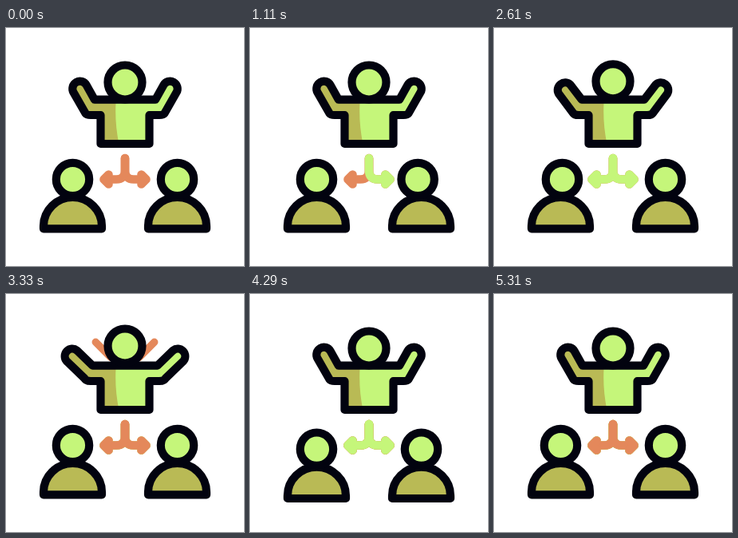
An HTML page that plays this animation: 298x298 px, repeating every 5400 ms.

```html
<!DOCTYPE html>
<html lang="en">
<head>
<meta charset="utf-8">
<title>Team leader</title>
<style>
html, body { margin: 0; width: 100%; height: 100%; overflow: hidden; background: #fff; }
svg { display: block; width: 100vw; height: 100vh; }
.line { fill: none; stroke-linecap: round; stroke-linejoin: round; }
.outline { stroke: #02030f; stroke-width: 10.2; stroke-linejoin: round; }
.arrow { stroke-width: 10.6; }
.ray { stroke: #e4885b; stroke-width: 9.4; }
</style>
</head>
<body>
<svg viewBox="0 0 298 298">
  <defs>
    <clipPath id="bodyClip"><path class="bodyPath"/></clipPath>
    <path id="bust" d="M47 251.300V248A36.500 36 0 0 1 120 248V251.300Z" fill="#b9ba55" class="outline"/>
    <circle id="face" cx="83.500" cy="189.500" r="20.700" fill="#c5f67a" class="outline"/>
  </defs>
  <g id="rays"></g>
  <g clip-path="url(#bodyClip)">
    <rect x="60" y="55" width="180" height="95" fill="#c5f67a"/>
    <path d="M60 55H137.500V94Q136 122 142.500 150H60Z" fill="#b9ba55"/>
  </g>
  <path class="bodyPath line outline"/>
  <circle id="head" cx="149" cy="68" r="21.500" fill="#c5f67a" class="outline"/>
  <g id="arrows"></g>
  <g id="members">
    <use href="#bust"/>
    <use href="#bust" x="131"/>
    <use href="#face" id="leftFace"/>
    <use href="#face" id="rightFace"/>
  </g>
</svg>
<script>
const LOOP = 5400, STEP = 30, LAST = 5310, BEAT = 590;
const ORANGE = '#e4885b', GREEN = '#c5f67a';
const find = id => document.getElementById(id);
const bodies = document.querySelectorAll('.bodyPath');

const clamp = x => Math.min(1, Math.max(0, x));
const ramp = (x, from, to) => clamp((x - from) / (to - from));
const smooth = x => x * x * (3 - 2 * x);
const hump = x => Math.sin(Math.PI * x) ** 2;
const mix = (a, b, k) => a + (b - a) * k;

function addPath(parent, className, d, stroke) {
  const path = document.createElementNS('http://www.w3.org/2000/svg', 'path');
  path.setAttribute('class', 'line ' + className);
  if (d) path.setAttribute('d', d);
  if (stroke) path.setAttribute('stroke', stroke);
  parent.append(path);
  return path;
}

// Shows the first part of a path, or nothing at all.
function reveal(path, amount) {
  path.style.display = amount > 0 ? '' : 'none';
  path.setAttribute('pathLength', 1);
  path.setAttribute('stroke-dasharray', amount < 1 ? amount + ' 2' : 'none');
}

function makeArrow(side, color) {
  const x = d => 149 + side * d;
  return {
    shaft: addPath(find('arrows'), 'arrow',
      `M149 163V178Q149 189.500 ${x(11)} 189.500H${x(23)}`, color),
    tip: addPath(find('arrows'), 'arrow',
      `M${x(20.5)} 183.500L${x(26.5)} 189.500L${x(20.5)} 195.500`, color)
  };
}

function growArrow(arrow, amount) {
  reveal(arrow.shaft, ramp(amount, 0, 0.78));
  reveal(arrow.tip, ramp(amount, 0.78, 1));
}

const layers = [ORANGE, GREEN, ORANGE, GREEN, ORANGE].map(color =>
  [1, -1].map(side => makeArrow(side, color)));

// Start and end of each colour sweep: right arrow, then left arrow.
const sweeps = [
  [[-2, -1], [-2, -1]],
  [[0, 540], [1140, 1740]],
  [[2850, 3300], [2850, 3300]],
  [[3330, 3900], [3330, 3900]],
  [[4560, 5100], [4560, 5100]]
];

const rays = [-1, 0, 1].map(side => ({
  path: addPath(find('rays'), 'ray'),
  angle: side * Math.PI / 4
}));

function armPoints(wide) {
  const p = (x0, y0, x1, y1) => [mix(x0, x1, wide), mix(y0, y1, wide)];
  return {
    elbow: p(99.6, 107, 98.2, 105.5),
    outer: p(84.5, 80.6, 76, 84.1),
    inner: p(100.7, 71.4, 88.8, 70.7),
    shoulder: p(110.9, 89.7, 108.4, 89.7)
  };
}

function bodyPath(wide) {
  const { elbow, outer, inner, shoulder } = armPoints(wide);
  const flip = ([x, y]) => [298 - x, y];
  return `M118.500 145V109H106Q${elbow[0] + 1.5} 109 ${elbow}L${outer}` +
    `A9.300 9.300 0 0 1 ${inner}L${shoulder}L${flip(shoulder)}L${flip(inner)}` +
    `A9.300 9.300 0 0 1 ${flip(outer)}L${flip(elbow)}` +
    `Q${298 - elbow[0] - 1.5} 109 192 109H179.500V145Z`;
}

function drawRays(beat) {
  const phase = beat % 1;
  const active = beat > 5 && beat < 9 && phase > 0.45;
  const end = mix(30, 75.3, ramp(phase, 0.45, 0.85));
  const start = mix(25, 75.3, ramp(phase, 0.85, 1));
  for (const { path, angle } of rays) {
    const at = r => `${149 + r * Math.sin(angle)} ${97 - r * Math.cos(angle)}`;
    path.style.display = active ? '' : 'none';
    path.setAttribute('d', `M${at(start)}L${at(end)}`);
  }
}

function drawMembers(time, beat) {
  const nodding = beat > 5.75 && beat < 8.75;
  const nod = nodding ? 4.7 * hump(beat - 5.75) : 0;
  find('members').setAttribute('transform', `translate(0 ${nod})`);
  find('rightFace').setAttribute('x', 131 - 4.6 * hump(ramp(time, 510, 1560)));
  find('leftFace').setAttribute('x', 4.6 * hump(ramp(time, 1800, 2850)));
}

function draw(time) {
  const beat = time / BEAT, phase = beat % 1;
  const wide = smooth(ramp(phase, 0.28, 0.6)) - smooth(ramp(phase, 0.68, 0.88));
  const d = bodyPath(wide);
  bodies.forEach(body => body.setAttribute('d', d));
  find('head').setAttribute('cy', 68 - 3 * wide);

  layers.forEach((pair, i) => pair.forEach((arrow, j) =>
    growArrow(arrow, ramp(time, ...sweeps[i][j]))));
  drawMembers(time, beat);
  drawRays(beat);
}

const began = performance.now();
function tick() {
  const time = (performance.now() - began) % LOOP;
  draw(Math.min(LAST, Math.floor(time / STEP) * STEP));
  requestAnimationFrame(tick);
}
tick();
</script>
</body>
</html>
```
